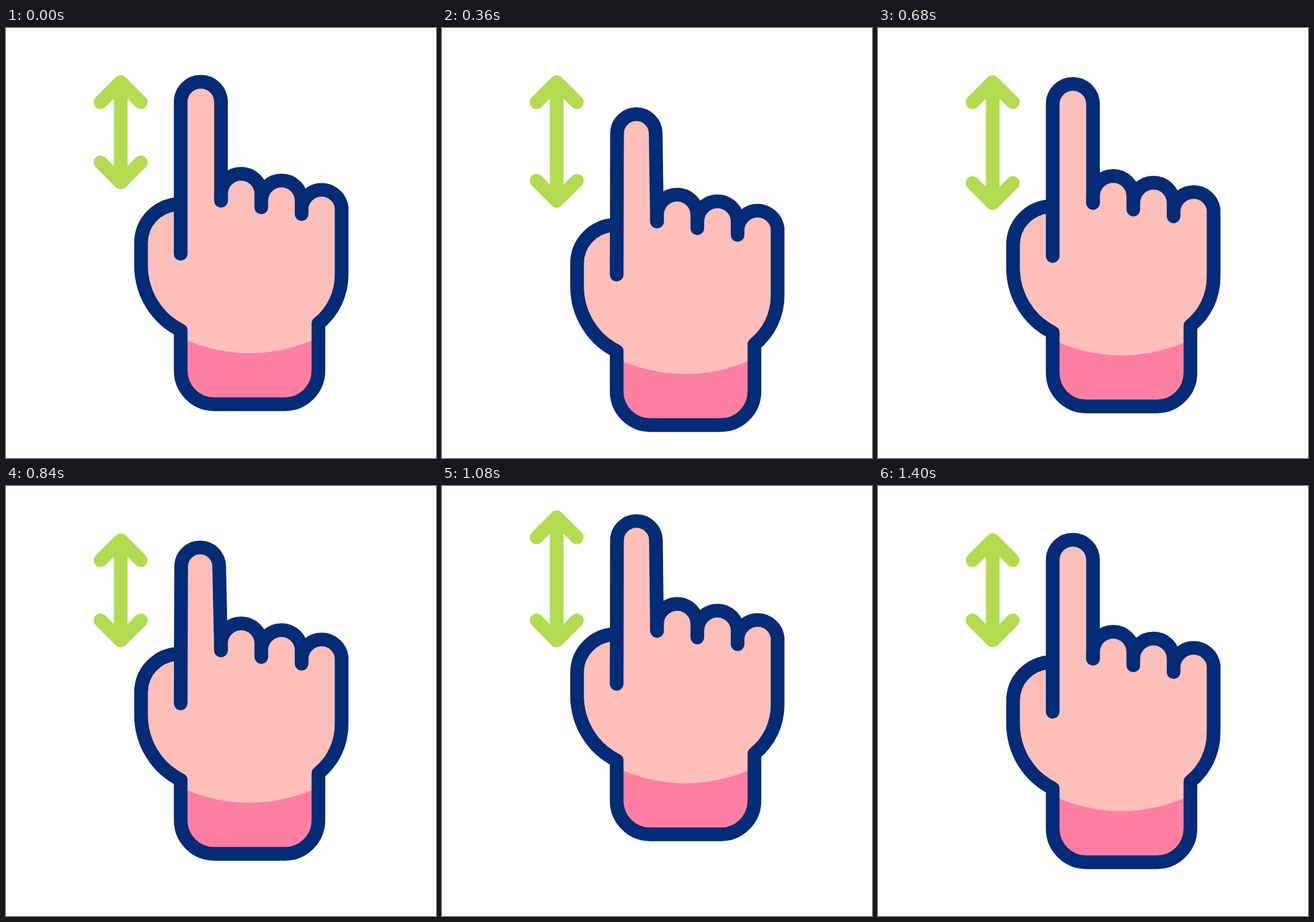
An HTML page for the animation above (1480 ms loop, 640x640 px).

```html
<!DOCTYPE html>
<html lang="en">
<head>
<meta charset="utf-8">
<title>Scroll gesture</title>
<style>
  html, body { margin: 0; width: 100%; height: 100%; overflow: hidden; background: #fff; }
  svg { display: block; width: 100%; height: 100%; }
  .line { fill: none; stroke: #032b76; stroke-width: 20.4; stroke-linecap: round; stroke-linejoin: round; }
  .arrow { fill: none; stroke: #b3db52; stroke-width: 20.4; stroke-linecap: round; stroke-linejoin: round; }
</style>
</head>
<body>
<svg viewBox="0 0 640 640">
  <path id="arrow" class="arrow"/>
  <g id="hand">
    <path id="skin" fill="#fdbfba"/>
    <path fill="#ff7fa2" d="M260 461Q362 507 465 461V510A50 50 0 0 1 415 560H310A50 50 0 0 1 260 510Z"/>
    <path id="outline" class="line"/>
    <path id="finger" class="line"/>
  </g>
</svg>
<script>
const LOOP = 1480, STEP = 40;
const $ = id => document.getElementById(id);

const knuckles = "V247A30 30 0 0 1 380 247V267V257A30 30 0 0 1 440 257V277V267A30 30 0 0 1 499.5 267";
const body = "V367C499.5 396 487 422 465 440V510A50 50 0 0 1 415 560H310A50 50 0 0 1 260 510V450" +
  "C224 432 201 395 201 353V320C201 289 224 265 255 262";

$("outline").setAttribute("d", "M320 257" + knuckles + body);

// Piecewise linear value through [time, value] points
function track(points, t) {
  if (t <= points[0][0]) return points[0][1];
  for (let i = 1; i < points.length; i++) {
    const [t0, v0] = points[i - 1], [t1, v1] = points[i];
    if (t <= t1) return v0 + (v1 - v0) * (t - t0) / (t1 - t0);
  }
  return points[points.length - 1][1];
}

// Cubic ease-out from 1 to 0 over 200 ms
const settle = t => Math.pow(1 - Math.min(1, Math.max(0, t / 200)), 3);

function handShift(t) {
  if (t <= 560) return Math.max(0, t - 50) * 0.1;
  const down = 51 * settle(t - 560);
  const up = track([[737, 0], [840, -12.5], [1080, -41.5], [1160, -49]], t);
  return t <= 1160 ? down + up : -49 * settle(t - 1160);
}

const bend = t => track([[50, 0], [200, 35], [516, 0], [737, 0], [887, 35], [1203, 0]], t);
const lower = t => track([[56, 0], [590, 48], [840, 0]], t);
const raise = t => track([[840, 0], [1080, -34], [1160, -44.5], [1400, 0]], t);

function draw(t) {
  const b = bend(t);
  const left = 260 + b / 35, right = 320 - 4 * b / 35;
  const r = (right - left) / 2, y = 110 + b - (30 - r);
  const tip = `L${left} ${y}A${r} ${r} 0 0 1 ${right} ${y}L320 257`;
  $("finger").setAttribute("d", "M260 336" + tip);
  $("skin").setAttribute("d", "M260 262" + tip + knuckles + body + "Z");
  $("hand").setAttribute("transform", `translate(0 ${handShift(t)})`);

  const top = 80.5 + raise(t), end = 230 + lower(t);
  $("arrow").setAttribute("d",
    `M140.7 ${top + 30}L170.7 ${top}L200.7 ${top + 30}M170.7 ${top}V${end}` +
    `M140.7 ${end - 30}L170.7 ${end}L200.7 ${end - 30}`);
}

const start = performance.now();
function tick(now) {
  const t = Math.max(0, now - start) % LOOP;
  draw(Math.floor(t / STEP) * STEP);
  requestAnimationFrame(tick);
}
draw(0);
requestAnimationFrame(tick);
</script>
</body>
</html>
```
